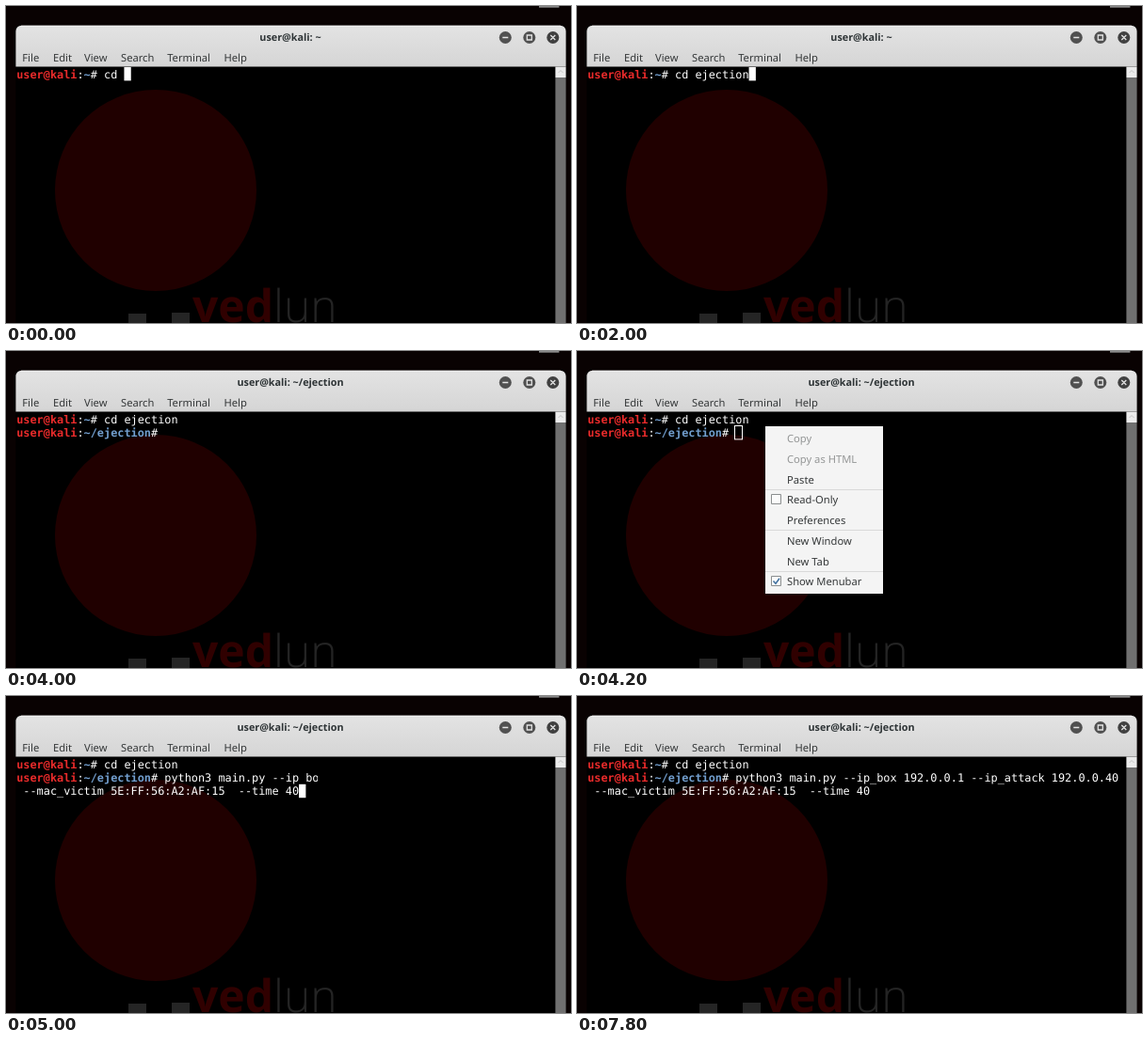
Animation of 600x337 px, one loop 8000 ms. Source, as an HTML page:

```html
<!DOCTYPE html>
<html lang="en">
<head>
<meta charset="utf-8">
<title>Terminal</title>
<style>
  html, body { margin: 0; width: 100%; height: 100%; overflow: hidden; background: #090202; }
  svg { display: block; width: 600px; height: 337px; }
  text { white-space: pre; text-rendering: geometricPrecision; }
  .ui { font: 11.2px "Noto Sans", "Open Sans", sans-serif; fill: #353839; }
  .title { font-weight: 700; font-size: 10.8px; text-anchor: middle; fill: #2e3436; }
  .off { fill: #949696; }
  .lit { fill: #fff; }
  .mono { font: 11.86px "DejaVu Sans Mono", monospace; fill: #fff; }
  .who { font-weight: 700; fill: #ea2b2b; }
  .dir { font-weight: 700; fill: #729fcf; }
  .brand { font: 700 48px "Open Sans", "Noto Sans", sans-serif; fill: #300000; }
  .thin { font-weight: 300; fill: #242424; }
</style>
</head>
<body>
<svg viewBox="0 0 600 337">
  <defs>
    <linearGradient id="bar" x2="0" y2="1">
      <stop offset="0" stop-color="#e3e3e3"/>
      <stop offset="1" stop-color="#d5d5d5"/>
    </linearGradient>
    <clipPath id="clip"><rect id="reveal" x="160" y="78" width="420" height="17"/></clipPath>
  </defs>

  <!-- desktop and window -->
  <rect x="566" width="21.400" height="1.700" fill="#8a8a8a"/>
  <path d="M10.400 337V27a6 6 0 0 1 6-6.300H588.600a6 6 0 0 1 6 6.300V337z"/>
  <path d="M10.400 64.600V27a6 6 0 0 1 6-6.300H588.600a6 6 0 0 1 6 6.300V64.600z" fill="url(#bar)"/>
  <path d="M16 21.300H589" stroke="#f0f0f0"/>
  <rect x="583.400" y="64.600" width="11.200" height="11.400" fill="#ececec"/>
  <path d="M586.500 71l2.500-2.500 2.500 2.500" fill="none" stroke="#c4c4c4"/>
  <rect x="583.400" y="76" width="11.200" height="261" fill="#707070"/>
  <g fill="#505050">
    <circle cx="530.300" cy="33.500" r="6.500"/>
    <circle cx="555.800" cy="33.500" r="6.500"/>
    <circle cx="580.800" cy="33.500" r="6.500" fill="#404040"/>
  </g>
  <path d="M527.300 33.500h6M553.300 31h5v5h-5zM578.300 31l5 5m0-5l-5 5" fill="none" stroke="#e4e4e4" stroke-width="1.300"/>
  <text id="title" class="ui title" x="302" y="37"></text>
  <g id="menubar"></g>

  <!-- wallpaper -->
  <circle cx="159" cy="196" r="107" fill="#200000"/>
  <path d="M130 327h19v10h-19zM176 326h19v11h-19z" fill="#252525"/>
  <text class="brand" x="198" y="336">ved<tspan class="thin">lun</tspan></text>

  <!-- shell -->
  <g class="mono">
    <text x="11.200" y="76.700"><tspan class="who">user@kali</tspan>:<tspan class="dir">~</tspan># cd <tspan id="typed"></tspan></text>
    <text id="prompt" x="11.200" y="91"><tspan class="who">user@kali</tspan>:<tspan class="dir">~/ejection</tspan>#</text>
    <text id="cmd" y="91" clip-path="url(#clip)"></text>
    <text id="args" x="11.200" y="105.300"> --mac_victim 5E:FF:56:A2:AF:15  --time 40</text>
  </g>
  <rect id="cursor" stroke="#fff"/>
  <g id="popup">
    <rect x="200" y="80" width="125" height="178" fill="#f4f4f4"/>
    <rect id="hover" x="200" y="125" width="125" height="22" fill="#4a90d9"/>
    <path d="M200 147.500h125M200 190.500h125M200 234.500h125" stroke="#d9d9d9"/>
    <path d="M206.500 152.500h10v10h-10zM206.500 239.500h10v10h-10z" fill="#fbfbfb" stroke="#8b8e8f"/>
    <path d="M208.500 244.500l2.500 2.700 4-5.500" fill="none" stroke="#3f6f9f" stroke-width="1.500"/>
  </g>
</svg>
<script>
const LOOP = 8000, CELL = 7.14, ROW = 14.4, LEFT = 11.2, TOP = 65;
const $ = id => document.getElementById(id);

function label(parent, x, y, str, cls = '') {
  const t = document.createElementNS('http://www.w3.org/2000/svg', 'text');
  t.setAttribute('x', x);
  t.setAttribute('y', y);
  t.setAttribute('class', 'ui ' + cls);
  t.textContent = str;
  parent.append(t);
  return t;
}

Object.entries({ File: 17.3, Edit: 50, View: 83, Search: 122, Terminal: 171.2, Help: 231.4 })
  .forEach(([name, x]) => label($('menubar'), x, 59.2, name));
const items = ['Copy', 'Copy as HTML', 'Paste', 'Read-Only', 'Preferences', 'New Window', 'New Tab', 'Show Menubar']
  .map((name, i) => label($('popup'), 223, 97 + i * 21.75, name, i < 2 ? 'off' : ''));
const paste = items[2];
$('cmd').setAttribute('x', LEFT + 22 * CELL);

// Each step changes only the listed fields; at = [column, row] of the cursor.
const steps = [
  [0, { typed: 0, at: [16, 0], cursor: 'solid', inDir: false, popup: false, hover: false, cmd: 0, args: false, joined: false }],
  [300, { typed: 1, at: [17, 0] }],
  [500, { typed: 2, at: [18, 0] }],
  [700, { typed: 3, at: [19, 0] }],
  [1000, { typed: 5, at: [21, 0], cursor: 'thin' }],
  [1100, { cursor: 'solid' }],
  [1200, { typed: 6, at: [22, 0] }],
  [1400, { typed: 7, at: [23, 0] }],
  [2000, { typed: 8, at: [24, 0] }],
  [2200, { inDir: true, at: [22, 1] }],
  [2700, { cursor: 'none' }],
  [3300, { cursor: 'solid' }],
  [4000, { cursor: 'none' }],
  [4200, { cursor: 'hollow', popup: true }],
  [4500, { hover: true }],
  [5000, { popup: false, cmd: 171, args: true, at: [42, 2], cursor: 'solid' }],
  [5100, { cmd: 420 }],
  [5600, { cursor: 'none' }],
  [6200, { cursor: 'solid' }],
  [6800, { cursor: 'none' }],
  [7100, { joined: true, at: [0, 3], cursor: 'solid' }],
  [7700, { cursor: 'none' }]
];

const show = (id, on) => { $(id).style.display = on ? '' : 'none'; };

function drawCursor(kind, [col, row]) {
  const hollow = kind === 'hollow';
  const x = LEFT + col * CELL, y = TOP + row * ROW;
  const box = {
    x: hollow ? Math.round(x) - 0.5 : x,
    y: hollow ? Math.round(y) + 0.5 : y,
    width: kind === 'thin' ? 2 : hollow ? 8 : 7.3,
    height: 14.4,
    fill: hollow ? 'none' : '#fff',
    'stroke-width': hollow ? 1 : 0
  };
  for (const key in box) $('cursor').setAttribute(key, box[key]);
  show('cursor', kind !== 'none');
}

function render(time) {
  const s = Object.assign({}, ...steps.filter(([t]) => t <= time).map(([, change]) => change));
  $('title').textContent = 'user@kali: ~' + (s.inDir ? '/ejection' : '');
  $('typed').textContent = 'ejection'.slice(0, s.typed);
  $('cmd').textContent = `python3 main.py --ip${s.joined ? '_' : ' '}box 192.0.0.1 --ip_attack 192.0.0.40`;
  $('reveal').setAttribute('width', s.cmd);
  show('prompt', s.inDir);
  show('args', s.args);
  show('popup', s.popup);
  show('hover', s.hover);
  paste.classList.toggle('lit', s.hover);
  drawCursor(s.cursor, s.at);
}

const start = performance.now();
let last = -1;
function tick() {
  const time = (performance.now() - start) % LOOP;
  const index = steps.filter(([t]) => t <= time).length;
  if (index !== last) render(time);
  last = index;
  requestAnimationFrame(tick);
}
tick();
</script>
</body>
</html>
```
